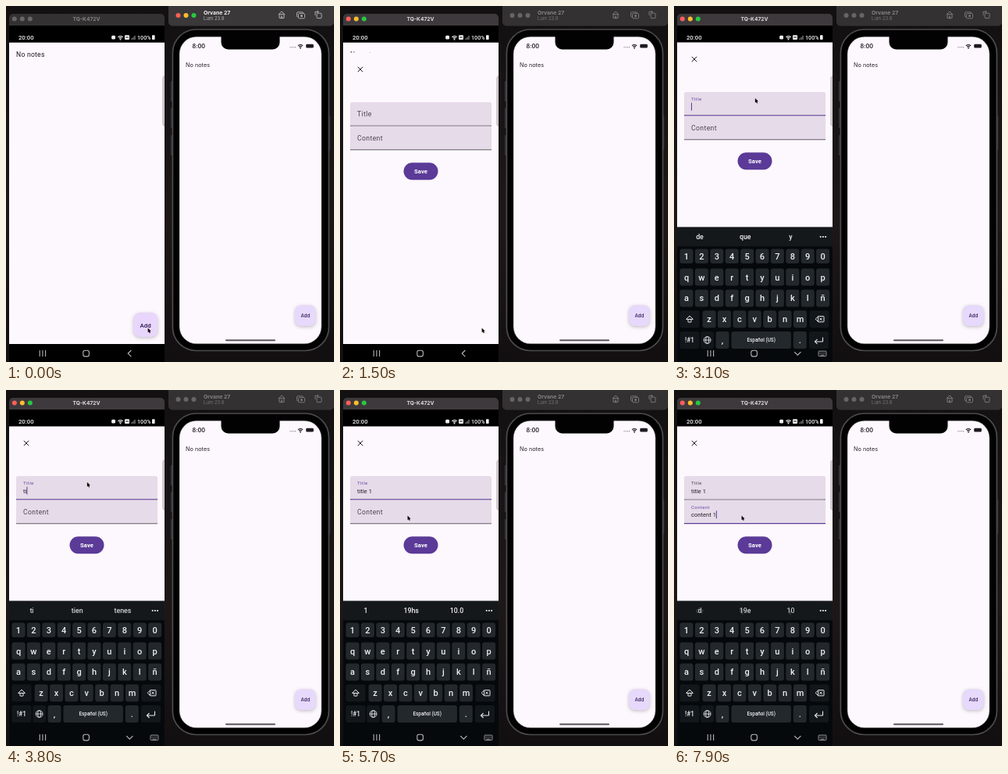
Recreate the animation shown at these times as an HTML page with a canvas. Size 420 by 455 pixels, loop 8000 ms.

```html
<!DOCTYPE html>
<html lang="en">
<head>
<meta charset="utf-8">
<title>Notes on two phones</title>
<style>
html, body { margin: 0; width: 100%; height: 100%; overflow: hidden; background: #141112; }
canvas { display: block; width: 420px; height: 455px; }
</style>
</head>
<body>
<canvas id="stage"></canvas>
<script>
const W = 420, H = 455, LOOP = 8000, STEP = 100;
const canvas = document.getElementById('stage');
const ratio = window.devicePixelRatio || 1;
canvas.width = W * ratio;
canvas.height = H * ratio;
const c = canvas.getContext('2d');

const PAGE = '#fdf8fd', INK = '#1d1b20', PURPLE = '#5b3a98', GREY = '#49454f';
const ROBOTO = 'Roboto, sans-serif', INTER = 'Inter, sans-serif';
const LEFT = 4, RIGHT = 203, TOP = 46.4, BOTTOM = 432, KEYS_TOP = 269.7, PITCH = 19.4;
const ACTIVATE = 1000, FORM_IN = 1150, KEYS_IN = 2850;

const titleField = {
  name: 'Title', y: 110, focus: 2800, start: 3480, pace: 220,
  value: 'title 1', words: ['tien', 'tenes'], numbers: ['1', '19hs', '10.0']
};
const contentField = {
  name: 'Content', y: 140.7, focus: 5900, start: 6200, pace: 200,
  value: 'content 1', words: ['contenido', 'contexto'], numbers: ['d', '19e', '10']
};

const clamp = v => Math.max(0, Math.min(1, v));
const mix = (a, b, p) => a + (b - a) * p;
const easeOut = p => 1 - (1 - clamp(p)) ** 3;
const easeBoth = p => { p = clamp(p); return p * p * (3 - 2 * p); };

function typedCount(f, t) {
  return Math.max(0, Math.min(f.value.length, Math.floor((t - f.start) / f.pace) + 1));
}

function lastEdit(f, t) {
  const n = typedCount(f, t);
  return n ? f.start + (n - 1) * f.pace : f.focus;
}

function suggest(f, n) {
  const word = f.value.slice(0, n).split(' ').pop();
  if (!word) return ['de', 'que', 'y'];
  return word === '1' ? f.numbers : [word, ...f.words];
}

function box(x, y, w, h, r, fill, stroke, width = 1) {
  c.beginPath();
  c.roundRect(x, y, w, h, r);
  if (fill) { c.fillStyle = fill; c.fill(); }
  if (stroke) { c.strokeStyle = stroke; c.lineWidth = width; c.stroke(); }
}

function dot(x, y, r, fill) {
  c.beginPath();
  c.arc(x, y, r, 0, 7);
  c.fillStyle = fill;
  c.fill();
}

function line(x1, y1, x2, y2, color, width = 1) {
  c.strokeStyle = color;
  c.lineWidth = width;
  c.beginPath();
  c.moveTo(x1, y1);
  c.lineTo(x2, y2);
  c.stroke();
}

function cross(x, y, r, color, width = 1) {
  line(x - r, y - r, x + r, y + r, color, width);
  line(x - r, y + r, x + r, y - r, color, width);
}

// Turn counts quarter turns: 0 right, 1 down, 2 left, 3 up.
function chevron(x, y, r, turn, color, width = 1, closed = false) {
  c.save();
  c.translate(x, y);
  c.rotate(turn * Math.PI / 2);
  c.beginPath();
  c.moveTo(-r / 2, -r);
  c.lineTo(r / 2, 0);
  c.lineTo(-r / 2, r);
  if (closed) c.closePath();
  c.strokeStyle = color;
  c.lineWidth = width;
  c.stroke();
  c.restore();
}

function text(s, x, y, size, color, { font = ROBOTO, weight = 400, align = 'left', gap = 0 } = {}) {
  c.font = `${weight} ${size}px ${font}`;
  c.letterSpacing = gap + 'px';
  c.textAlign = align;
  c.fillStyle = color;
  c.fillText(s, x, y + size * 0.36);
  return c.measureText(s).width;
}

function clipped(y, h, draw) {
  c.save();
  c.beginPath();
  c.rect(LEFT, y, RIGHT - LEFT, h);
  c.clip();
  draw();
  c.restore();
}

function fab(x, y, w, r, size, fill, font) {
  c.save();
  c.shadowColor = 'rgba(0,0,0,.24)';
  c.shadowBlur = 4 * ratio;
  c.shadowOffsetY = 1.2 * ratio;
  box(x, y, w, w, r, fill);
  c.restore();
  text('Add', x + w / 2, y + w / 2 + 0.3, size, '#2b1752', { font, weight: 500, align: 'center' });
}

function lights(x, y, active) {
  ['#fe5f57', '#febc2e', '#28c840'].forEach((color, i) =>
    dot(x + i * 10, y, 3, active ? color : '#686568'));
}

function wifi(x, y, color) {
  c.strokeStyle = color;
  c.lineWidth = 1.2;
  for (const r of [2.4, 4.4]) {
    c.beginPath();
    c.arc(x, y, r, -2.35, -0.79);
    c.stroke();
  }
  dot(x, y - 0.3, 0.9, color);
}

function wallpaper() {
  const g = c.createLinearGradient(0, 0, 0, H);
  g.addColorStop(0, '#121011');
  g.addColorStop(0.6, '#1e1718');
  g.addColorStop(1, '#120f10');
  c.fillStyle = g;
  c.fillRect(0, 0, W, H);
}

function toolbar(color) {
  chevron(353, 9, 4.2, 3, color);
  box(350, 10.6, 6, 5, 0.5, null, color);
  line(353, 12.6, 353, 15.6, color, 1.4);
  box(372.5, 7.8, 8, 6.2, 1.2, null, color, 0.9);
  box(374.5, 9.6, 8, 6.2, 1.2, '#343133', color, 0.9);
  dot(378.5, 12.7, 1.4, color);
  box(398, 9.2, 6, 6.4, 1, null, color, 0.9);
  line(396, 7.4, 400, 7.4, color, 0.9);
  line(396, 7, 396, 12, color, 0.9);
  chevron(399.5, 7.4, 1.6, 0, color, 0.9);
}

function rightPhone(active) {
  box(208, -6, 212, 31.5, 5, active ? '#3b383a' : '#343133');
  lights(220.5, 12, active);
  text('Orvane 27', 253, 8.7, 6.8, active ? '#f4f2f4' : '#858285', { font: INTER, weight: 700 });
  text('Lum 23.8', 253, 16, 6, active ? '#b5b2b5' : '#777477', { font: INTER });
  toolbar(active ? '#b9b6b9' : '#807d80');

  for (const y of [96, 130, 165]) box(210.8, y, 2.6, 26, 1, '#333133');
  box(412.6, 140, 2.6, 44, 1, '#333133');
  box(213.4, 30, 200, 410.5, 30, '#020202', '#4c4b4d', 1.7);
  box(222, 39.2, 182, 392.6, 22, PAGE, 'rgba(70,68,70,.5)', 0.8);
  box(275.5, 37, 75, 18.5, [0, 0, 9, 9], '#020202');

  text('8:00', 238.5, 51.3, 7.25, INK, { font: INTER, weight: 600 });
  for (let i = 0; i < 4; i++) dot(364 + i * 2.2, 52.7, 0.6, '#77747a');
  wifi(377, 54, INK);
  box(384.2, 48.8, 9.6, 4.8, 1.4, INK);

  text('No notes', 230, 75.2, 7.3, '#2a282d', { font: INTER });
  fab(370, 382.5, 26.6, 7.5, 6.1, '#e6d9fb', INTER);
  box(281, 426.2, 64, 2, 1, '#5a565c');
}

function statusBar() {
  const white = '#f3f3f3';
  text('20:00', 16, 40, 7.7, white, { weight: 500 });
  box(135.2, 37.8, 4.8, 4.8, 1.4, white);
  wifi(146.5, 43, white);
  box(152, 37.2, 6, 5.8, 1, white);
  line(153, 40, 157, 40, '#222');
  for (let i = 0; i < 3; i++) line(161 + i * 2, 43, 161 + i * 2, 41.4 - i * 1.7, '#aaa');
  text('100%', 168, 40, 7.2, white, { weight: 500 });
  box(187, 37.2, 3.6, 5.8, 0.7, white);
}

function leftFrame(active) {
  box(LEFT, 10, RIGHT - LEFT, 24, [5, 5, 0, 0], active ? '#3d393c' : '#343133');
  lights(10.8, 16.6, active);
  text('TQ-K472V', 103, 16.8, 6.7, active ? '#dedbde' : '#858285', { font: INTER, weight: 700, align: 'center' });
  c.fillStyle = '#000';
  c.fillRect(LEFT, 25, RIGHT - LEFT, H);
  statusBar();
}

function blankPage() {
  c.fillStyle = PAGE;
  c.fillRect(LEFT, TOP, RIGHT - LEFT, BOTTOM - TOP);
}

function notesPage() {
  blankPage();
  text('No notes', 13, 61.7, 8.6, INK, { gap: 0.25 });
  fab(163.2, 392, 31, 8.5, 7.9, '#e9d6fc', ROBOTO);
}

function drawField(f, t, focused) {
  const { y } = f, h = 30.5;
  const lift = easeBoth((t - f.focus) / 150);
  const thick = focused ? 1.2 : 0.8;
  box(13, y, 181, h, [2.5, 2.5, 0, 0], '#e6dbe8');
  c.fillStyle = focused ? PURPLE : GREY;
  c.fillRect(13, y + h - thick, 181, thick);
  text(f.name, 22, y + mix(15.3, 9.2, lift), mix(8.6, 6.2, lift),
    focused ? '#6a4ba8' : GREY, { gap: mix(0.4, 0.32, lift) });
  const width = text(f.value.slice(0, typedCount(f, t)), 22, y + 18.9, 7.4, INK, { gap: 0.1 });
  if (focused && (t - lastEdit(f, t)) % 1000 < 500) {
    c.fillStyle = PURPLE;
    c.fillRect(22 + width, y + 13.6, 1, 10);
  }
}

function formPage(t, current) {
  blankPage();
  cross(26, 68, 3.2, INK);
  for (const f of [titleField, contentField]) drawField(f, t, f === current && t >= f.focus);
  box(81.5, 187.3, 44, 22, 11, PURPLE);
  text('Save', 103.5, 198.4, 7.7, '#fff', { weight: 700, align: 'center' });
}

function key(label, x, y, { w = 17, h = 22, size = 11, fill = '#23282d' } = {}) {
  box(x - w / 2, y - h / 2, w, h, 3, fill);
  text(label, x, y, size, '#eef0f2', { weight: 500, align: 'center' });
}

function suggestions(words, alpha) {
  c.globalAlpha = alpha;
  words.forEach((w, i) => text(w, 33 + i * 58.2, 282, 8.8, '#f0f1f2', { weight: 500, align: 'center' }));
  c.globalAlpha = 1;
}

function globe(x, y, color) {
  c.strokeStyle = color;
  c.lineWidth = 0.9;
  for (const rx of [4.4, 2]) {
    c.beginPath();
    c.ellipse(x, y, rx, 4.4, 0, 0, 7);
    c.stroke();
  }
  line(x - 4.4, y, x + 4.4, y, color, 0.9);
}

function keyboard(t, f) {
  const white = '#e8eaec', special = { w: 25, size: 8.2, fill: '#12171b' };
  c.fillStyle = '#06090c';
  c.fillRect(LEFT, KEYS_TOP, RIGHT - LEFT, 200);
  c.fillStyle = '#14181b';
  c.fillRect(LEFT, KEYS_TOP, RIGHT - LEFT, 24.5);

  const n = typedCount(f, t);
  const fade = n ? clamp((t - lastEdit(f, t)) / 130) : 1;
  if (fade < 1) suggestions(suggest(f, n - 1), 1 - fade);
  suggestions(suggest(f, n), fade);
  for (let i = 0; i < 3; i++) dot(187.7 + i * 3.2, 282, 1.1, white);

  const rowY = i => 306.8 + i * 26.8;
  ['1234567890', 'qwertyuiop', 'asdfghjklñ', 'zxcvbnm'].forEach((row, r) =>
    [...row].forEach((ch, i) =>
      key(ch, 103.3 + (i - (row.length - 1) / 2) * PITCH, rowY(r), { h: r ? 22 : 18.5 })));

  const y = rowY(3), low = rowY(4);
  key('', 20, y, special);
  key('', 186, y, special);
  key('!#1', 20, low, special);
  key('', 185.5, low, special);
  key('', 42.6, low, { fill: special.fill });
  key(',', 62, low);
  key('Español (US)', 111.7, low, { w: 76.5, size: 6.3 });
  key('.', 161.3, low);

  chevron(20, y - 2, 4.4, 3, white, 1, true);
  box(18, y + 0.3, 4, 3.6, 0.4, null, white);
  chevron(183, y, 3.6, 2, white);
  box(184.6, y - 3.6, 7.4, 7.2, 0.6, null, white);
  cross(188, y, 1.7, white);
  globe(42.6, low, white);
  line(180.5, low + 2, 190.5, low + 2, white, 1.1);
  line(190.5, low + 2, 190.5, low - 3.5, white, 1.1);
  chevron(182, low + 2, 3, 2, white, 1.1);
}

function navBar(typing) {
  const color = '#b4b5b7', y = 444.1;
  for (let i = -1; i <= 1; i++) line(46.9 + i * 3.7, y - 4, 46.9 + i * 3.7, y + 4, color, 1.1);
  box(98.8, y - 3.8, 7.6, 7.6, 2.3, null, color, 1.1);
  chevron(158.3, y, 4.1, typing ? 1 : 2, color, 1.2);
  if (!typing) return;
  box(185, y - 3, 10, 6.4, 0.8, null, color, 0.8);
  for (let i = 0; i < 8; i++) dot(187 + i % 4 * 2, y - 1 + (i >> 2) * 1.7, 0.5, color);
  line(187.5, y + 2.2, 192.5, y + 2.2, color, 0.7);
}

function pointer(t) {
  const a = easeBoth((t - 1900) / 800), b = easeBoth((t - 5000) / 500);
  const x = mix(mix(181.6, 103.8, a), 86.5, b);
  const y = mix(mix(411.5, 117.8, a), 160.4, b);
  c.beginPath();
  c.moveTo(x, y);
  c.lineTo(x, y + 5.6);
  c.lineTo(x + 4, y + 4);
  c.closePath();
  c.strokeStyle = 'rgba(255,255,255,.7)';
  c.lineWidth = 0.8;
  c.stroke();
  c.fillStyle = '#0b0a0c';
  c.fill();
  line(x + 1.4, y + 3.5, x + 2.8, y + 6.4, '#0b0a0c', 1.2);
}

function draw(t) {
  c.setTransform(ratio, 0, 0, ratio, 0, 0);
  wallpaper();
  const active = t >= ACTIVATE, typing = t >= KEYS_IN;
  const current = t >= contentField.focus ? contentField : titleField;
  rightPhone(!active);
  leftFrame(active);

  clipped(TOP, BOTTOM - TOP, () => {
    notesPage();
    c.translate(0, 386 * (1 - easeOut((t - FORM_IN) / 517)));
    formPage(t, current);
  });
  if (typing) clipped(TOP, H - TOP, () => {
    c.translate(0, 186 * (1 - easeOut((t - KEYS_IN) / 425)));
    keyboard(t, current);
  });
  navBar(typing);
  box(201, 90, 4, 63, 2, '#dcd8dc', '#a5a2a6', 0.9);
  c.fillStyle = '#191415';
  c.fillRect(RIGHT, 85, 4, 75);
  pointer(t);
}

function frame(now) {
  draw(Math.floor((now % LOOP) / STEP) * STEP);
  requestAnimationFrame(frame);
}
requestAnimationFrame(frame);
</script>
</body>
</html>
```
